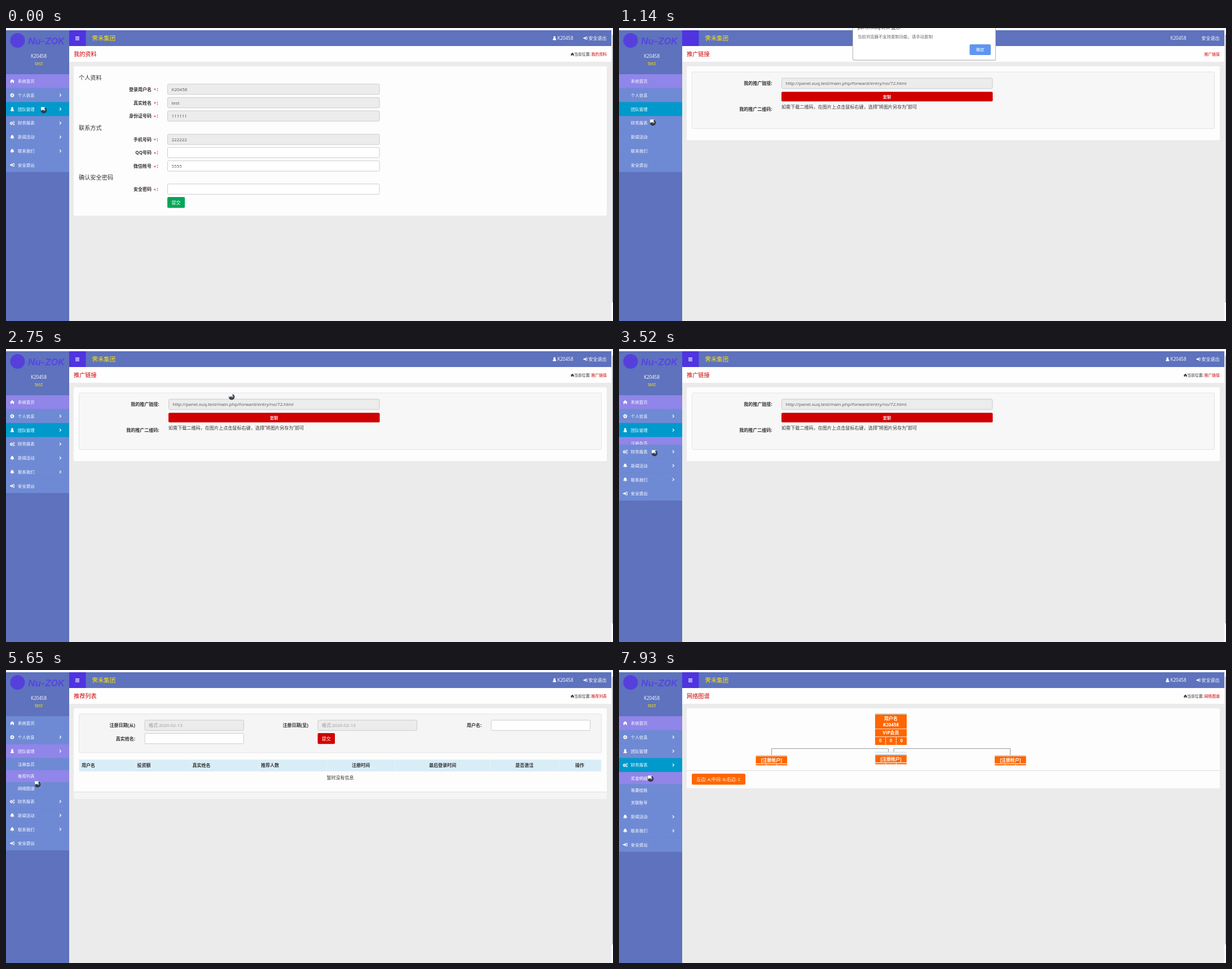
Animation, 1076 px wide and 520 px high, one loop 8 s. Source, as an HTML page:

```html
<!DOCTYPE html>
<html lang="zh-CN">
<head>
<meta charset="utf-8">
<title>Admin panel</title>
<style>
html, body { margin: 0; width: 100%; height: 100%; overflow: hidden; background: #fff; }
svg { display: block; width: 1076px; height: 520px; }
text { font-family: "Open Sans", "Noto Sans CJK SC", "Noto Sans CJK", sans-serif; white-space: pre; }
</style>
</head>
<body>
<svg id="stage" viewBox="0 0 1076 520" xmlns="http://www.w3.org/2000/svg"></svg>
<script>
const LOOP = 8000;
const USER = 'K20458', BRAND = '霁禾集团', HOST = 'panel.xuq.test';
const RED = '#d00000', ORANGE = '#ff6600', YELLOW = '#ffe600';
const PURPLE = '#9085e8', BLUE = '#0099cc', ROW = '#6f8ad4';
const ROW_H = 24.78, ROW_TOP = 82, SUB_H = 21.5;

// Drawing helpers; text is placed by its visual centre line.
const rect = (x, y, w, h, fill, extra = '') =>
  `<rect x="${x}" y="${y}" width="${w}" height="${h}" fill="${fill}" ${extra}/>`;
const text = (x, y, str, size = 8, fill = '#333', extra = '') =>
  `<text x="${x}" y="${y + size * 0.37}" font-size="${size}" fill="${fill}" ${extra}>${str}</text>`;
const MID = 'text-anchor="middle"', END = 'text-anchor="end"', BOLD = 'font-weight="700"';
const path = (d, stroke, w = 1) => `<path d="${d}" fill="none" stroke="${stroke}" stroke-width="${w}"/>`;
const at = (x, y, body, k = 1) => `<g transform="translate(${x} ${y}) scale(${k})">${body}</g>`;
const box = (x, y, w, h, fill, stroke = '#ccc') =>
  rect(x + .5, y + .5, w - 1, h - 1, fill, `stroke="${stroke}" rx="2"`);
const label = (x, y, str) => text(x, y, str, 8, '#333', `${END} ${BOLD}`);
const button = (x, y, w, h, fill, str, size = 8) =>
  rect(x, y, w, h, fill, 'rx="2"') + text(x + w / 2, y + h / 2, str, size, '#fff', MID);
const field = (x, y, w, str = '', disabled = true, color = '#555') =>
  box(x, y, w, 19.3, disabled ? '#ececec' : '#fff') + text(x + 7.5, y + 9.8, str, 8, color);

const gear = r => `<g fill="none" stroke="#fff"><circle r="${r * .62}" stroke-width="${r * .5}"/>
  <circle r="${r * .95}" stroke-width="${r * .3}" stroke-dasharray="${r * .373}"/></g>`;
const solid = (d, fill = '#fff') => `<path d="${d}" fill="${fill}"/>`;
const homeIcon = fill => solid('M-4 0L0-3.6 4 0H3V3.2H1V1H-1V3.2H-3V0Z', fill);
const userIcon = solid('M0-3.6a1.9 1.9 0 0 1 0 3.8 1.9 1.9 0 0 1 0-3.8M-3 3.5Q-3-.2 0-.2T3 3.5Z');
const bellIcon = solid('M-3.8 2Q-2.4 1-2.4-1Q-2.2-3 0-3.7Q2.2-3 2.4-1Q2.4 1 3.8 2ZM-1.1 2.5H1.1L0 3.8Z');
const exitIcon = solid('M-3.8-1h2.8v-2L2 0-1 3V1h-2.8ZM1-3H3.8V3H1V2H2.8V-2H1Z');
const gearsIcon = at(-1.4, .3, gear(2.7)) + at(2.8, -2, gear(1.6)) + at(2.8, 2.2, gear(1.6));

const MENU = [
  ['系统首页', homeIcon('#fff')], ['个人信息', gear(3.4), 1], ['团队管理', userIcon, 1],
  ['财务报表', gearsIcon, 1], ['新闻活动', bellIcon, 1], ['联系我们', bellIcon, 1], ['安全退出', exitIcon]
];
const SUBMENU = {
  2: ['注册会员', '推荐列表', '网络图谱'],
  3: ['奖金明细', '我要结账', '关联账号']
};

const panel = bottom => rect(120, 68, 945, bottom - 68, '#fdfdfd', 'rx="2"');
const well = (bottom, fill) => box(129, 77.5, 927, bottom - 77.5, fill, '#e3e3e3');

function profilePage() {
  const rows = [
    ['登录用户名', 99, USER, true], ['真实姓名', 122.8, 'test', true], ['身份证号码', 146.5, '111111', true],
    ['手机号码', 188, '222222', true], ['QQ号码', 211.5, '', false], ['微信帐号', 235.2, '5555', false],
    ['安全密码', 276.3, '', false]
  ];
  return panel(333) +
    [['个人资料', 88.5], ['联系方式', 177], ['确认安全密码', 265.5]]
      .map(([s, y]) => text(129, y, s, 10.2)).join('') +
    rows.map(([s, y, value, off]) => label(258, y + 9.8, s) +
      text(264, y + 10.5, '*', 8, '#f00', MID) + text(268.5, y + 9.8, ':', 8, '#333', `${MID} ${BOLD}`) +
      field(286, y, 376.5, value, off)).join('') +
    button(286, 300, 31, 19.3, '#00a65a', '提交');
}

function linkPage() {
  return panel(199) + well(179, '#f7f7f7') +
    label(271.5, 98, '我的推广链接:') +
    field(288, 88.5, 374.5, `http://${HOST}/main.php/forward/entry/no/72.html`) +
    rect(288, 113.3, 374.5, 17, RED, 'rx="2"') + text(475, 122, '复制', 7, '#fff', `${MID} ${BOLD}`) +
    label(271.5, 144.5, '我的推广二维码:') +
    text(288, 140.5, '如需下载二维码，在图片上点击鼠标右键，选择“将图片另存为”即可', 8.1);
}

const emptyPage = () => panel(120) + well(100, '#fafafa');

function listPage() {
  const date = '格式:2020-02-13';
  const left = [['用户名', 134], ['投资额', 232.5], ['真实姓名', 330.5], ['推荐人数', 452]];
  const centred = [['注册时间', 629], ['最后登录时间', 774], ['是否激活', 919], ['操作', 1017]];
  return panel(228.5) + well(147.5, '#f5f5f5') +
    label(229, 98, '注册日期(从)') + field(245.5, 88.5, 176.5, date, true, '#999') +
    label(536, 98, '注册日期(至)') + field(552.5, 88.5, 176.5, date, true, '#999') +
    label(843, 98, '用户名:') + field(859.5, 88.5, 176.5, '', false) +
    label(229, 122, '真实姓名:') + field(245.5, 112, 176.5, '', false) +
    button(552.5, 112, 30.5, 19.3, RED, '提交') +
    rect(129.5, 159, 925.5, 21, '#d9edf7') +
    [228.5, 326.5, 447.5, 568.5, 690, 858.5, 979.5].map(x => path(`M${x} 159V180`, '#e6f2f8')).join('') +
    left.map(([s, x]) => text(x, 169, s, 8, '#333', BOLD)).join('') +
    centred.map(([s, x]) => text(x, 169, s, 8, '#333', `${MID} ${BOLD}`)).join('') +
    text(592.5, 191.3, '暂时没有信息', 8, '#333', MID) +
    rect(120, 216, 945, 12.5, '#f5f5f5') + path('M120 216.5H1065', '#ddd');
}

function networkPage() {
  const white = (x, y, s) => text(x, y, s, 8, '#fff', `${MID} ${BOLD}`);
  const slot = (x, y) => rect(x, y, 55.5, 2, '#ccd0d6') + rect(x, y + 2, 55.5, 12.6, ORANGE) +
    white(x + 27.8, y + 8.8, '[注册帐户]') +
    [0, 18.8, 37.6].map(dx => rect(x + dx, y + 15.8, 18, 2.2, ORANGE)).join('');
  return panel(210) +
    rect(454, 77, 56, 2, '#ccd0d6') + rect(454, 79, 56, 54, ORANGE) +
    path('M454 104.5H510M454 118.5H510M472.7 118.5V133M491.3 118.5V133', '#ffe0cc') +
    white(482, 86.5, '用户名') + white(482, 97.5, USER) + white(482, 111.5, 'VIP会员') +
    [463.3, 482, 500.7].map(x => white(x, 125.5, '0')).join('') +
    path('M270.5 151V139.5H477.5V145.5M487 145.5V139.5H693.5V151', '#999') +
    path('M454 146H510', '#ccd0d6', 1.2) +
    slot(242.5, 151.2) + slot(454.3, 149.3) + slot(666, 151.2) +
    path('M120 178.5H1065', '#ddd') +
    button(129, 184, 95, 19.5, ORANGE, '左边: A;中间: B;右边: C', 7.8);
}

const PAGES = {
  profile: ['我的资料', profilePage], link: ['推广链接', linkPage], empty: ['推荐列表', emptyPage],
  list: ['推荐列表', listPage], network: ['网络图谱', networkPage]
};

const dialog = rect(414, -6, 254, 64, '#000', 'rx="2" opacity=".18"') +
  box(414, -6, 254, 63.5, '#fff', '#b5b5b5') +
  text(423, -1, `${HOST} 显示`, 8.6, '#333') +
  text(423, 15.3, '当前浏览器不支持复制功能，请手动复制', 7.4, '#666') +
  button(621.5, 29, 37.5, 19, '#5f96f0', '确定', 7.4);

const stage = document.getElementById('stage');
stage.innerHTML =
  rect(0, 0, 1076, 520, '#f8fafc') + rect(112, 32, 961, 488, '#ebebeb') + rect(112, 32, 961, 28, '#fefefe') +
  rect(1073, 32, 3, 488, '#fafafa') + rect(1074.3, 12, 1.7, 475, '#b9b9b9', 'id="thumb"') +
  rect(0, 4, 1073, 28, '#5e72bd') + rect(0, 4, 112, 516, '#5e72bd') + rect(112, 4, 29.5, 28, '#4f34e0') +
  '<circle cx="20.5" cy="22" r="13" fill="#5540dc"/>' +
  text(39, 22.5, 'Nu-ZOK', 16.5, '#5747e2', 'style="font-family:Inter,sans-serif" font-weight="700" font-style="italic"') +
  text(58, 50, USER, 8.1, '#fff', MID) + text(58, 63.5, 'test', 8.1, YELLOW, MID) +
  text(152.5, 18.5, BRAND, 10.4, YELLOW) +
  text(977.5, 18, USER, 8.1, '#fff') + text(1032.5, 18, '安全退出', 8, '#fff') +
  '<g class="icons">' + path('M123 15.8H130M123 18.3H130M123 20.8H130', '#fff', 1.3) +
  at(972.3, 18, userIcon) + at(1027, 18, exitIcon, .9) + at(1004, 46.7, homeIcon('#333'), .8) +
  text(1007, 46.7, '当前位置:', 6.9) + '</g>' +
  Object.entries(PAGES).map(([id, [title, draw]]) => `<g id="${id}">` + text(120, 46, title, 10.2, RED) +
    text(1065, 46.7, title, 6.9, RED, END) + draw() + '</g>').join('') +
  `<clipPath id="fold"><rect id="foldBox" width="112"/></clipPath>` +
  MENU.map(([name, icon, more], i) => `<g class="row">` + rect(0, 0, 112, ROW_H + .1, ROW) +
    text(21, 12.4, name, 7.4, '#fff') + '<g class="icons">' + at(11, 12.4, icon) +
    (more ? path('M95 10L97.4 12.4 95 14.8', '#fff', 1.2) : '') + '</g></g>').join('') +
  '<g clip-path="url(#fold)">' + Object.entries(SUBMENU).map(([i, names]) =>
    `<g class="sub" data-row="${i}" transform="translate(0 ${ROW_TOP + (+i + 1) * ROW_H})">` + rect(0, 0, 112, 68, ROW) +
    names.map((name, k) => rect(0, k * SUB_H, 112, SUB_H, ROW, 'class="item"') +
      text(21, k * SUB_H + 10.8, name, 7.4, '#fff')).join('') + '</g>').join('') + '</g>' +
  `<g id="dialog">${dialog}</g>` +
  '<g id="cursor"><circle r="5.3" fill="#26323c" opacity=".9"/>' +
  '<path d="M-5-5.5H2.5L1-3.5 3 0 .5 2-2-1-4.5 1Z" fill="#fff"/><circle r="1.6" cx=".3" cy=".3" fill="#26323c"/>' +
  '<circle r=".8" cx=".3" cy=".3" fill="#fff"/></g>';

const byId = id => document.getElementById(id);
const all = sel => [...stage.querySelectorAll(sel)];
const icons = all('.icons'), rows = all('.row'), subs = all('.sub');
const show = (el, on) => el.setAttribute('display', on ? 'inline' : 'none');

// Each step changes part of the state and holds until the next one.
const reset = { reveal: 0, active: 0, hover: 2 };
const opened = { reveal: 64.5, active: 2, hover: -1 };
const move = (t, x, y, change) => ({ t, x, y, ...change });
const STEPS = [
  move(0, 67, 146, { page: 'profile', open: 2, sub: 0, icons: true, dialog: false, ...reset }),
  move(120, 66, 146, { reveal: 14 }),
  move(270, 66, 147, { reveal: 46 }),
  move(420, 66, 147, { reveal: 64.5 }),
  move(570, 65, 147, opened),
  move(720, 65, 148),
  move(870, 64, 148),
  move(1020, 60, 167),
  move(1140, 60, 168, { page: 'link', icons: false, dialog: true, ...reset }),
  move(1420, 110, 164),
  move(1570, 250, 130),
  move(1700, 420, 88),
  move(1820, 560, 54),
  move(1950, 625, 39),
  move(2080, 636, 36),
  move(2340, 636, 36, { icons: true }),
  move(2490, 600, 42, { dialog: false }),
  move(2640, 400, 85),
  move(2800, 200, 128),
  move(2960, 90, 148),
  move(3120, 66, 150),
  move(3390, 64, 162),
  move(3520, 63, 185, { reveal: 13.5 }),
  move(3670, 62, 187, { reveal: 45 }),
  move(3820, 61, 189, { reveal: 64.5 }),
  move(4000, 60, 190, { sub: 1, ...opened }),
  move(4160, 59, 191),
  move(4310, 59, 191),
  move(4460, 58, 172, { page: 'empty', ...reset }),
  move(4580, 59, 151),
  move(4770, 59, 151, { page: 'list' }),
  move(4920, 59, 152, { reveal: 20 }),
  move(5070, 58, 165, { reveal: 50 }),
  move(5300, 57, 182, opened),
  move(5490, 56, 192),
  move(5650, 56, 203),
  move(5800, 55, 212, { sub: 2 }),
  move(5940, 55, 214),
  move(6080, 55, 215, { page: 'network', ...reset, hover: 5 }),
  move(7080, 56, 205, { hover: 4 }),
  move(7210, 57, 193),
  move(7340, 58, 180, { hover: 3 }),
  move(7470, 57, 177),
  move(7780, 57, 180, { open: 3, reveal: 30, sub: 0 }),
  move(7930, 56, 193, { reveal: 67 })
];

function render(time) {
  const s = Object.assign({}, ...STEPS.filter(step => step.t <= time));
  for (const id in PAGES) show(byId(id), id === s.page);
  icons.forEach(el => show(el, s.icons));
  show(byId('dialog'), s.dialog);
  byId('thumb').setAttribute('height', s.page === 'empty' ? 490 : 475);
  rows.forEach((el, i) => {
    el.setAttribute('transform', `translate(0 ${ROW_TOP + i * ROW_H + (i > s.open ? s.reveal : 0)})`);
    el.firstChild.setAttribute('fill', i === s.active ? PURPLE : i === s.hover ? BLUE : ROW);
  });
  subs.forEach(el => {
    show(el, +el.dataset.row === s.open);
    el.querySelectorAll('.item').forEach((item, k) => item.setAttribute('fill', k === s.sub ? PURPLE : ROW));
  });
  byId('foldBox').setAttribute('y', ROW_TOP + (s.open + 1) * ROW_H);
  byId('foldBox').setAttribute('height', s.reveal);
  byId('cursor').setAttribute('transform', `translate(${s.x} ${s.y})`);
}

const start = performance.now();
function tick() {
  render((performance.now() - start) % LOOP);
  requestAnimationFrame(tick);
}
render(0);
requestAnimationFrame(tick);
</script>
</body>
</html>
```
